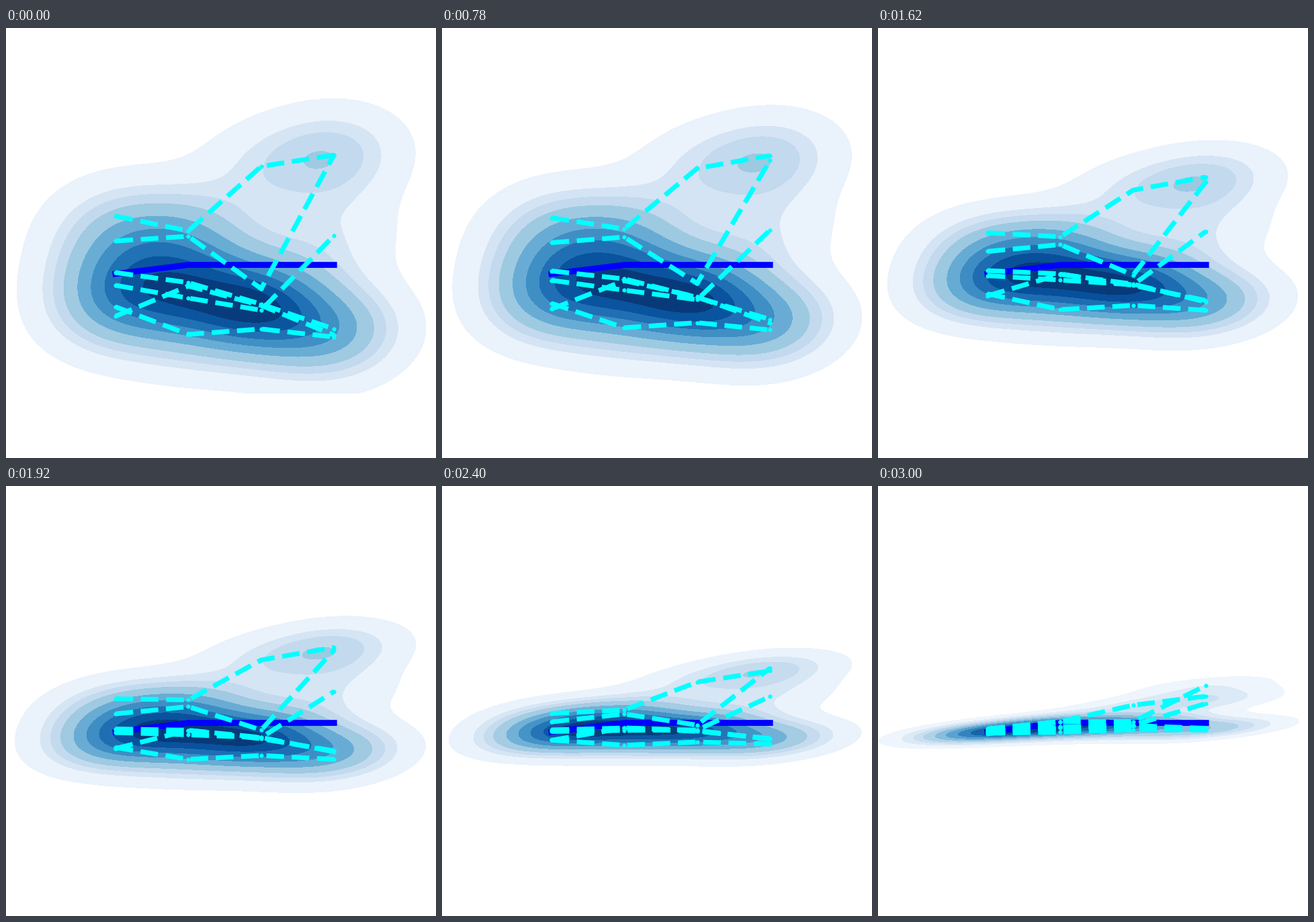
Recreate the animation shown at these times as a matplotlib script. Size 640 by 640 pixels, loop 3030 ms.

```python
import numpy as np
import matplotlib.pyplot as plt
from matplotlib.animation import FuncAnimation

FRAMES, INTERVAL = 101, 30
CUT, GRID, LEVELS = 3, 200, np.linspace(0.05, 1, 10)

STEP = np.arange(4)
XS = 163 + 108.4 * STEP
TARGET = [366, 352.6, 352.6, 352.6]

# Where each path starts, and how much it sways up on the way
# or drifts at its tip.
START = np.array([
    [280, 302, 206, 189],
    [317, 310, 388, 189],
    [364, 379, 411, 448],
    [383, 402, 420, 309],
    [415, 456, 448, 460],
    [429, 384, 413, 457],
])
SWAY = np.array([[-12.5, -5, -5, -11, 0, -8]]).T
DRIFT = np.array([[8, -8, 0, -7, 0, 0]]).T

# The paths are squeezed towards a rising line, less so further right.
CENTRE = 365.5 - 9.6 * STEP
REST = 0.05 + 0.055 * STEP


def ease(t):
    return (t * (1.35 - 0.3 * t - 0.05 * t**12)) ** 2


def heights(t):
    e = ease(t)
    squeeze = CENTRE + (START - CENTRE) * (1 - (1 - REST) * e)
    sway = SWAY * (0.7 + 0.2 * STEP) * np.sin(np.pi * t)
    return squeeze + sway + DRIFT * (STEP / 3) ** 3 * e**2


def density(x, y):
    """Gaussian kernel density with Scott's bandwidth."""
    cov = np.cov(x, y) * len(x) ** (-1 / 3)
    bx, by = CUT * np.sqrt(np.diag(cov))
    gx = np.linspace(x.min() - bx, x.max() + bx, GRID)
    gy = np.linspace(y.min() - by, y.max() + by, GRID)
    (a, b), (_, c) = np.linalg.inv(cov)
    z = np.zeros((GRID, GRID))
    for px, py in zip(x, y):
        dx, dy = gx[None, :] - px, gy[:, None] - py
        z += np.exp(-0.5 * (a * dx**2 + c * dy**2) - b * dx * dy)
    return gx, gy, z


def mass_levels(z):
    """Density values that enclose equal steps of probability mass."""
    ranked = np.sort(z.ravel())[::-1]
    mass = np.cumsum(ranked) / ranked.sum()
    return ranked.take(np.searchsorted(mass, 1 - LEVELS), mode="clip")


fig = plt.figure(figsize=(10, 10), dpi=64, facecolor="white")
ax = fig.add_axes([0, 0.15, 1, 0.85])
ax.set(xlim=(0, 640), ylim=(544, 0))
ax.axis("off")
ax.plot(XS, TARGET, color="blue", lw=10)
lines = [ax.plot(XS, row, "o--", color="cyan", lw=8)[0] for row in heights(0)]


def update(i):
    ys = heights(i / (FRAMES - 1))
    for shade in list(ax.collections):
        shade.remove()
    gx, gy, z = density(np.tile(XS, len(ys)), ys.ravel())
    ax.contourf(gx, gy, z, levels=mass_levels(z), cmap="Blues", zorder=1)
    for line, row in zip(lines, ys):
        line.set_ydata(row)
    return lines


anim = FuncAnimation(fig, update, frames=FRAMES, interval=INTERVAL,
                     repeat=True, repeat_delay=0, blit=False)
plt.show()
```
